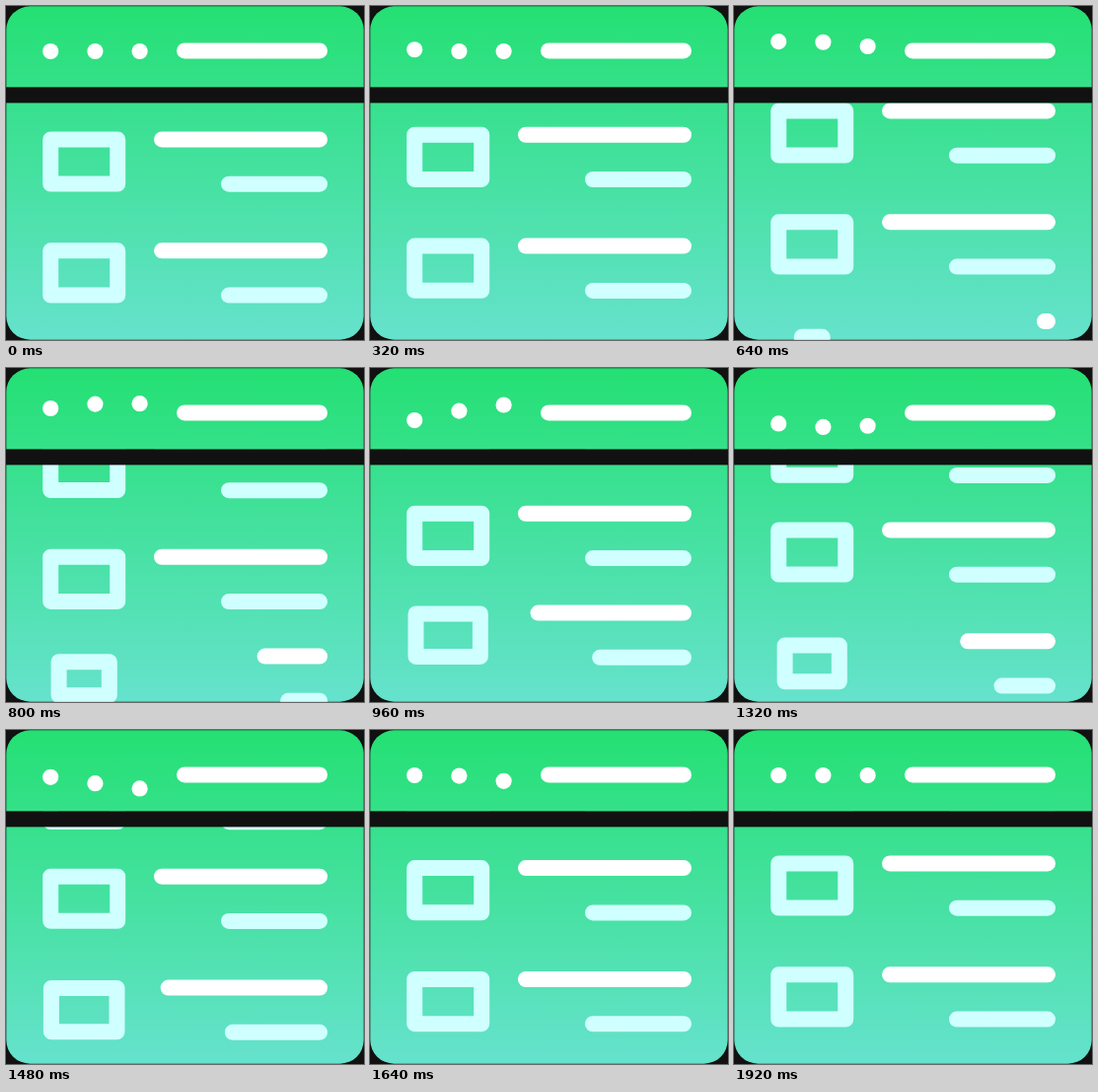
An HTML page with a canvas for the animation above (2000 ms loop, 363x339 px).

```html
<!DOCTYPE html>
<html lang="en">
<head>
<meta charset="utf-8">
<title>Scrolling list</title>
<style>
html, body { margin: 0; width: 100%; height: 100%; overflow: hidden; background: #111; }
canvas { display: block; width: 363px; height: 339px; }
</style>
</head>
<body>
<canvas id="stage" width="363" height="339"></canvas>
<script>
const ctx = document.getElementById('stage').getContext('2d');
const W = 363, H = 339, LOOP = 2000, STEP = 40, LAST = 1920;
const DARK = '#111', WHITE = '#fff', PALE = '#d0ffff';
const RIGHT = 318, CUT = [82.4, 98.4];

const clamp = x => Math.min(1, Math.max(0, x));
const span = (t, from, to) => clamp((t - from) / (to - from));

// Symmetric cubic-bezier(c, 0, 1 - c, 1), solved by bisection.
function ease(x, c) {
  let lo = 0, hi = 1;
  for (let i = 0; i < 30; i++) {
    const u = (lo + hi) / 2, v = 1 - u;
    if (3 * v * v * u * c + 3 * v * u * u * (1 - c) + u * u * u < x) lo = u;
    else hi = u;
  }
  return lo * lo * (3 - 2 * lo);
}

const scrollAt = t => 213.7 * ease(span(t, 40, 1920), 0.64);

// Dots hop up, dip below the line and settle.
function hop(t) {
  return -10 * ease(span(t, 200, 600), 0.45)
    + 24 * ease(span(t, 605, 1185), 0.5)
    - 14 * ease(span(t, 1185, 1575), 0.4);
}

const rows = [
  { y: 0 },
  { y: 112.9 },
  { y: 213.7, start: 565 },
  { y: 326.6, start: 1053 }
];
const GROW = 532;

const card = ctx.createLinearGradient(0, 0, 0, H);
card.addColorStop(0, '#24e073');
card.addColorStop(1, '#66e2cd');

function bar(x, y, color, part = 1) {
  if (part <= 0) return;
  ctx.strokeStyle = color;
  ctx.beginPath();
  ctx.moveTo(RIGHT - (RIGHT - x) * part, y);
  ctx.lineTo(RIGHT, y);
  ctx.stroke();
}

function box(y, size) {
  if (size <= 0) return;
  const w = 68 * size, h = 45.2 * size;
  ctx.strokeStyle = PALE;
  ctx.strokeRect(79.2 - w / 2, y - h / 2, w, h);
}

function drawRow(row, t, scroll) {
  const y = row.y - scroll;
  const x = row.start ? span(t, row.start, row.start + GROW) : 1;
  const part = ease(x, 0.64);
  box(158 + y, 1 - Math.pow(1 - x, 2.4));
  if (x > 0) {
    bar(158, 135.4 + y, WHITE, part);
    bar(226, 180.7 + y, PALE, part);
  }
}

function draw(t) {
  ctx.fillStyle = DARK;
  ctx.fillRect(0, 0, W, H);
  ctx.save();
  ctx.beginPath();
  ctx.roundRect(0.3, 0.3, W - 0.6, H - 0.6, 24);
  ctx.fillStyle = card;
  ctx.fill();
  ctx.clip();

  ctx.lineWidth = 16;
  ctx.lineCap = ctx.lineJoin = 'round';
  const scroll = scrollAt(t);
  rows.forEach(row => drawRow(row, t, scroll));
  ctx.restore();

  // Header covers rows that scroll past the divider.
  ctx.save();
  ctx.beginPath();
  ctx.rect(0, 0, W, CUT[0]);
  ctx.clip();
  ctx.fillStyle = DARK;
  ctx.fillRect(0, 0, W, CUT[0]);
  ctx.fillStyle = card;
  ctx.beginPath();
  ctx.roundRect(0.3, 0.3, W - 0.6, H - 0.6, 24);
  ctx.fill();
  ctx.restore();
  ctx.fillStyle = DARK;
  ctx.fillRect(0, CUT[0], W, CUT[1] - CUT[0]);

  ctx.lineWidth = 16;
  ctx.lineCap = 'round';
  bar(181, 45.4, WHITE);
  ctx.fillStyle = WHITE;
  for (let i = 0; i < 3; i++) {
    ctx.beginPath();
    ctx.arc(45.2 + 45.2 * i, 46 + hop(t - 120 * i), 8.1, 0, Math.PI * 2);
    ctx.fill();
  }
}

function frame() {
  const t = Math.floor((performance.now() % LOOP) / STEP) * STEP;
  draw(Math.min(t, LAST));
  requestAnimationFrame(frame);
}
frame();
</script>
</body>
</html>
```
